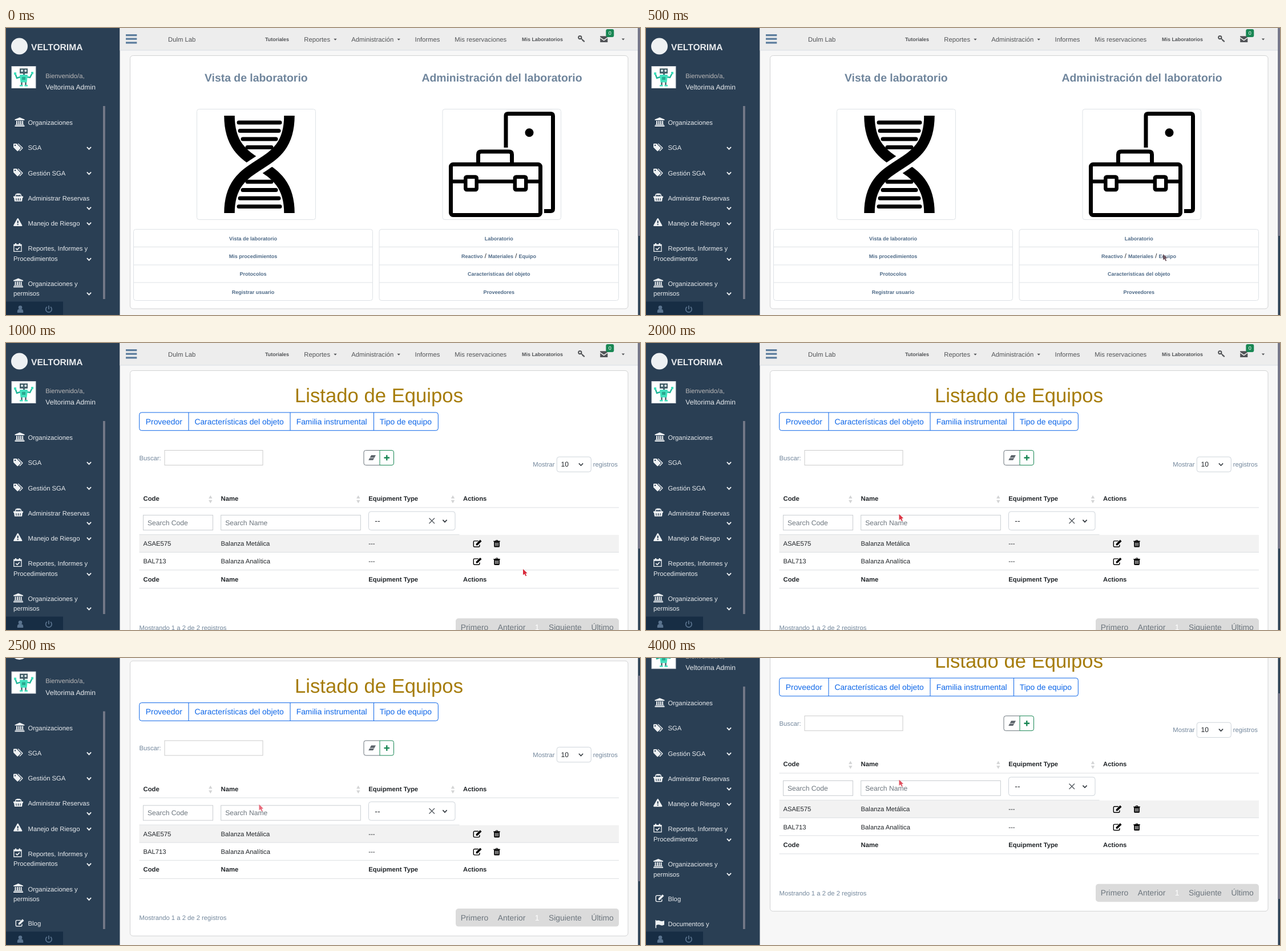
Animation of 1111x504 px, one loop 4.5 s. Source, as an HTML page:

```html
<!DOCTYPE html>
<html lang="es">
<head>
<meta charset="utf-8">
<title>Laboratorio</title>
<style>
html, body { margin: 0; width: 100%; height: 100%; overflow: hidden; background: #f7f7f7; }
svg { display: block; width: 1111px; height: 504px; }
text { font-family: "Liberation Sans", Arial, sans-serif; font-size: 11.27px; fill: #212529; text-rendering: geometricPrecision; white-space: pre; }
.b { font-weight: bold; }
.mid { text-anchor: middle; }
.nav { fill: #515356; }
.small { font-size: 8.95px; }
.link { font-size: 9px; fill: #4e6a87; }
.head { font-size: 19.4px; fill: #6f859c; }
.title { font-size: 34.68px; fill: #a67c0a; }
.muted { fill: #73879c; }
.field { font-size: 12.14px; }
.hint { fill: #6c757d; }
.big { font-size: 13.87px; }
.blue { fill: #0d66e8; }
.side { fill: #e9ecef; }
.line { fill: none; }
</style>
</head>
<body>
<svg id="stage" viewBox="0 0 1111 504">
  <defs>
    <g id="bank"><path d="M8.5 0 17 3.6V5H0V3.6Z"/><path d="M3.5 6V12M7 6V12M10.3 6V12M13.6 6V12" stroke="currentColor" stroke-width="2"/><path d="M1.2 12H15.8V13.2H1.2ZM0 14H17V16H0Z"/></g>
    <g id="tags"><path fill-rule="evenodd" d="M0 1Q0 0 1 0H5.5L12.5 7Q13.2 7.8 12.5 8.5L8 13Q7.2 13.6 6.5 13L0 6.4ZM3 1.8A1.2 1.2 0 1 0 3 4.2 1.2 1.2 0 1 0 3 1.8Z"/><path d="M7.2 0H9L16.2 7Q17 7.8 16.2 8.5L11.6 13.2 10.3 12.6 14.5 8.2Q14.9 7.7 14.4 7.2Z"/></g>
    <g id="basket"><path fill-rule="evenodd" d="M0 5H17V7.4H16L15 14H2L1 7.4H0ZM4.2 8.5 4.6 12.4H5.8L5.4 8.5ZM7.8 8.5V12.4H9.2V8.5ZM11.6 8.5 11.2 12.4H12.4L12.8 8.5Z"/><path class="line" stroke="currentColor" stroke-width="1.4" d="M3 6 4.4 1.5H6.3M14 6 12.6 1.5H10.7M6.3 .8H10.7V2.2H6.3Z"/></g>
    <path id="warn" fill-rule="evenodd" d="M7.7 0Q8.4 0 8.8 .7L15.3 12.4Q15.6 14 14.3 14H1.1Q-.2 14 .1 12.4L6.6 .7Q7 0 7.7 0ZM6.5 4.6 6.9 9H8.5L8.9 4.6ZM6.7 10.2V12H8.7V10.2Z"/>
    <g id="calendar" class="line" stroke="currentColor"><path stroke-width="1.3" d="M.8 2.4H14V14.4H.8Z"/><path stroke-width="2.4" d="M1 3.6H14M4 0V3.6M10.8 0V3.6"/><path stroke-width="1.7" d="M4.2 9 6.6 11.3 10.8 7"/></g>
    <g id="edit"><path class="line" stroke="currentColor" stroke-width="1.4" d="M9.4 2H2.6Q.8 2 .8 3.8V10.6Q.8 12.4 2.6 12.4H9.6Q11.4 12.4 11.4 10.6V8.6"/><path d="M12.4 0 15 2.6 7.8 9.7H5.2V7.1Z"/></g>
    <path id="flag" d="M0 0H1.6V1.4Q5-.2 8 1.4T15.5 1V8.4Q12 10.4 8.6 8.8T1.6 9V14H0Z"/>
    <path id="trash" fill-rule="evenodd" d="M0 2H3.3L4.2 .3H7.3L8.2 2H11.5V3.5H10.6V11.4Q10.6 13 9.2 13H2.3Q.9 13 .9 11.4V3.5H0ZM4.4 2H7.1L6.7 1.3H4.8ZM3 5V11H4V5ZM5.2 5V11H6.2V5ZM7.5 5V11H8.5V5Z"/>
    <path id="chevron" class="line" d="M-3.6-1.9 0 1.9 3.6-1.9"/>
    <path id="caret" d="M0 0H5.4L2.7 2.9Z"/>
    <path id="sort" d="M-3.2-1.5 0-7 3.2-1.5ZM-3.2 1.5 0 7 3.2 1.5Z"/>
  </defs>
  <rect width="1111" height="504" fill="#f7f7f7"/>
  <rect width="199.5" height="504" fill="#2a3f54"/>
  <g id="page">
    <g id="sidebar" fill="#eef1f3" color="#eef1f3"></g>
    <g id="topbar" fill="#515356"></g>
    <g id="lab"></g>
    <g id="list"></g>
    <path id="cursor" d="M0 0V10.5L2.5 8.4 4.7 12.4 6.3 11.6 4.4 7.7 7.5 7.3Z"/>
  </g>
  <rect y="480.5" width="100" height="23.5" fill="#172d44"/>
  <g fill="#5a738e">
    <circle cx="25" cy="490.8" r="3.3"/>
    <path d="M19.8 500V497.5Q20 494 23 493.6H27Q30 494 30.2 497.5V500Z"/>
    <path class="line" stroke="#5a738e" stroke-width="1.7" d="M71.8 489.8A5.2 5.2 0 1 0 78 489.8M74.9 487.5V494"/>
  </g>
  <rect id="sideThumb" x="170" width="3.8" fill="#747988"/>
  <rect x="1107.5" width="3.5" height="504" fill="#2a3f54"/>
  <rect id="pageThumb" x="1107.5" width="3.5" fill="#747488"/>
</svg>
<script>
const $ = id => document.getElementById(id);
const text = (x, y, cls, str) => `<text x="${x}" y="${y}" class="${cls}">${str}</text>`;
const icon = (id, x, y, attrs = '') => `<use href="#${id}" transform="translate(${x} ${y})" ${attrs}/>`;
const box = (x, y, right, bottom, r = 0, stroke = '#dee2e6', fill = '#fff') =>
  `<rect x="${x}" y="${y}" width="${right - x}" height="${bottom - y}" rx="${r}" fill="${fill}" stroke="${stroke}"/>`;
const path = (d, stroke, width = 1, attrs = '') =>
  `<path class="line" d="${d}" stroke="${stroke}" stroke-width="${width}" ${attrs}/>`;
const each = (items, draw) => items.map(draw).join('');

// Sidebar: icon, icon x, icon y, first baseline, lines, chevron y
const menu = [
  ['bank', 15.5, 157, 170, ['Organizaciones']],
  ['tags', 13, 203, 214.3, ['SGA'], 211],
  ['tags', 13, 247, 258.5, ['Gestión SGA'], 255],
  ['basket', 13, 290.5, 302.8, ['Administrar Reservas'], 316.5],
  ['warn', 13, 334, 347, ['Manejo de Riesgo'], 343.5],
  ['calendar', 13, 378, 391.3, ['Reportes, Informes y', 'Procedimientos'], 406],
  ['bank', 13, 439.5, 453, ['Organizaciones y', 'permisos'], 466.5],
  ['edit', 16.5, 502, 513.8, ['Blog']],
  ['flag', 16.5, 547, 558, ['Documentos y']],
];

const robot = `
  <rect x="10" y="67.5" width="42" height="38" fill="#fff" stroke="#d4d9de"/>
  <g stroke="#1fb598" stroke-width="2.4" class="line">
    <path d="M25 86 19 88 16.5 81M37 86 42 87 45.5 80"/>
    <path d="M27.5 95V101M34.5 95V101" stroke="#46606a"/>
  </g>
  <path d="M24 71H38V80H24ZM30 78H33V83H30Z" fill="#46606a"/>
  <path d="M24 82H38L36.5 95.5H25.5ZM24 100H29.5V102.5H24ZM32.5 100H38V102.5H32.5ZM14 78H18V82H14ZM44 77H48V81H44Z" fill="#42e0bd"/>
  <circle cx="28" cy="75" r="1.9" fill="#e8f4f5"/><circle cx="34.3" cy="75" r="1.9" fill="#e8f4f5"/>
  <path d="M28 86H34V91H28Z" fill="#2aa88f"/>`;

$('sidebar').innerHTML =
  '<circle cx="23.5" cy="32" r="14.5"/>' +
  text(44, 39, 'side b" style="font-size:15.6px', 'VELTORIMA') + robot +
  text(69.3, 87.8, '" style="fill:#bab8b8', 'Bienvenido/a,') +
  text(69.3, 108.3, 'side field', 'Veltorima Admin') +
  each(menu, ([id, x, y, base, lines, chevron]) =>
    icon(id, x, y) + text(38.6, base, 'side', lines[0]) +
    (lines[1] ? text(13, base + 17.4, 'side', lines[1]) : '') +
    (chevron ? icon('chevron', 145.5, chevron, 'stroke="#eef1f3" stroke-width="1.9"') : ''));

$('topbar').innerHTML =
  '<rect x="199.5" width="908" height="39" fill="#ededed"/>' + path('M199.5 39H1107.5', '#d9dee4') +
  path('M210 12.6H229.3M210 19.2H229.3M210 25.8H229.3', '#5c7d9d', 3.2) +
  each([[284, 'Dulm Lab'], [522.3, 'Reportes'], [605.3, 'Administración'], [716.5, 'Informes'], [786.3, 'Mis reservaciones']],
    ([x, str]) => text(x, 23.7, 'nav', str)) +
  text(454, 23.2, 'nav b small', 'Tutoriales') + text(904, 23.2, 'nav b small', 'Mis Laboratorios') +
  each([[574.3, 18.8], [685.5, 18.8], [1078.8, 18.6]], ([x, y]) => icon('caret', x, y)) +
  '<circle cx="1005.8" cy="16.6" r="2.6" fill="none" stroke="#515356" stroke-width="2"/>' +
  path('M1007.8 18.4 1013.8 24M1010 22.6 1011.6 20.8M1012 24.2 1013.4 22.4', '#515356', 1.8) +
  '<path d="M1041.2 14.3H1054.3V16L1047.8 20.6 1041.2 16ZM1041.2 17.8 1047.8 22.4 1054.3 17.8V25H1041.2Z"/>' +
  box(1051.3, 2, 1065.3, 16, 3, 'none', '#198754') +
  text(1058.3, 12.2, 'mid" style="fill:#fff;font-size:9px', '0');

const dna = () => {
  const over = 'M496.5 154C496.5 209 468 224 444 240S391.5 271 391.5 325';
  const under = 'M391.5 154C391.5 209 420 224 444 240S496.5 271 496.5 325';
  const rungs = each([[36, 166], [34, 180.5], [29, 195], [21, 209.5]],
    ([half, y]) => `M${444 - half} ${y}H${444 + half}M${444 - half} ${479.5 - y}H${444 + half}`);
  return path(under, '#000', 18.5) + path(over, '#fff', 31) +
    path(rungs, '#000', 7, 'stroke-linecap="round"') + path(over, '#000', 18.5);
};

const toolbox = () =>
  path('M876 210V154Q876 150.500 880 150.500H954.500Q958.500 150.500 958.500 154.500V317.500Q958.500 321.500 954.500 321.500H943', '#000', 7) +
  '<circle cx="917" cy="183.700" r="7.500"/>'.replace(/00"/g, '"') +
  path('M827.5 237V222Q827.5 217 832.5 217H881.5Q886.5 217 886.5 222V237', '#000', 7) +
  `<g stroke-width="7">${box(779.5, 239.5, 936.5, 328.5, 4, '#000')}</g>` +
  path('M779 269.5H937', '#000', 6.5) +
  `<g stroke-width="6.5">${box(805.3, 261.5, 824.7, 284, 2, '#000')}${box(891.8, 261.5, 911.2, 284, 2, '#000')}</g>`;

const linkBox = (x, right, rows) =>
  box(x, 353.5, right, 478.5, 4) +
  path(each([384.5, 416, 447], y => `M${x} ${y}H${right}`), '#dee2e6') +
  each(rows, (row, i) => row ? text((x + right) / 2, 373 + i * 31.2, 'mid b link', row) : '');

$('lab').innerHTML =
  box(217.5, 48.5, 1090, 493, 5, '#d2d3d4') +
  text(438.3, 94, 'mid b head', 'Vista de laboratorio') +
  text(869, 94, 'mid b head', 'Administración del laboratorio') +
  box(334.5, 142.5, 542.5, 336.5, 4) + box(765, 142.5, 972.5, 336.5, 4) + dna() + toolbox() +
  linkBox(223.5, 642.5, ['Vista de laboratorio', 'Mis procedimientos', 'Protocolos', 'Registrar usuario']) +
  linkBox(654, 1073.5, ['Laboratorio', '', 'Características del objeto', 'Proveedores']) +
  each([[798, 'Reactivo'], [845, 'Materiales'], [898.5, 'Equipo']], ([x, str]) => text(x, 404.2, 'b link', str)) +
  text(838.8, 404.2, '', '/') + text(892.2, 404.2, '', '/');

const columns = [[240.5, 'Code'], [376.6, 'Name'], [635.3, 'Equipment Type'], [801, 'Actions']];
const tableHead = y => each(columns, ([x, str]) => text(x, y, 'b', str));
const tableRow = (y, cells) =>
  each(cells, (str, i) => text(columns[i][0], y, '', str)) +
  icon('edit', 818.5, y - 10.5) + icon('trash', 854.3, y - 10.5);

$('list').innerHTML =
  box(217.5, 48.5, 1090, 531.5, 5, '#d2d3d4') +
  text(653.5, 104.3, 'mid title', 'Listado de Equipos') +
  box(233.7, 122, 757.3, 153.7, 4, '#0d66e8') + path('M320 122V153.700M498 122V153.700M644.500 122V153.700', '#0d66e8') +
  each([[244.8, 'Proveedor'], [330.4, 'Características del objeto'], [508.7, 'Familia instrumental'], [654.8, 'Tipo de equipo']],
    ([x, str]) => text(x, 142.6, 'big blue', str)) +
  text(233.5, 205.6, 'muted', 'Buscar:') + box(278, 188.5, 450, 214.5, 0, '#ccc') +
  path('M655 188.500H630.500Q627 188.500 627 192V211Q627 214.500 630.500 214.500H655', '#6c757d') +
  path('M655 188.500H676Q679.500 188.500 679.500 192V211Q679.500 214.500 676 214.500H655Z', '#198754') +
  '<path d="M640 197H648L643.2 205.700H635.200Z" fill="#5b636a"/>' + path('M637.200 201.800H644.600', '#fff', .9) +
  path('M667.3 196.700V206.300M662.500 201.500H672.100', '#198754', 2.4) +
  text(923.3, 217.2, 'muted', 'Mostrar') + box(965.3, 200, 1025.3, 226.3, 4, '#ced4da') +
  text(972.5, 217.3, 'field', '10') + icon('chevron', 1007.5, 213.3, 'stroke="#343a40" stroke-width="1.6"') +
  text(1028.7, 217.2, 'muted', 'registros') +
  tableHead(277) + each([358.3, 617.3, 783], x => icon('sort', x, 274.5, 'fill="#d3d4d5"')) +
  box(233.5, 337, 1074, 367.5, 0, 'none', '#f2f2f2') +
  path('M233.500 289H1074M233.500 336.500H794.500M233.500 367.500H1074M233.500 398.700H1074M233.500 430.700H1074', '#dcdfe2') +
  box(240.5, 302.3, 362.5, 328.5, 0, '#c8ccd0') + box(376.7, 302.3, 621.3, 328.5, 0, '#c8ccd0') +
  text(248, 319.5, 'field hint', 'Search Code') + text(384.2, 319.5, 'field hint', 'Search Name') +
  box(635.5, 296, 787, 328.5, 4, '#ced4da') + text(646.3, 317, 'big', '--') +
  path('M741.500 307.500 751 317M751 307.500 741.500 317', '#555b61', 1.4) +
  icon('chevron', 769, 312.5, 'stroke="#343a40" stroke-width="1.7"') +
  tableRow(356.1, ['ASAE575', 'Balanza Metálica', '---']) +
  tableRow(387.4, ['BAL713', 'Balanza Analítica', '---']) + tableHead(418.5) +
  text(233.5, 503.5, 'muted', 'Mostrando 1 a 2 de 2 registros') +
  box(788, 483.5, 1074, 515, 5, 'none', '#dbdbdb') +
  each([[796.7, 'Primero'], [861.8, 'Anterior'], [951, 'Siguiente'], [1025.5, 'Último']],
    ([x, str]) => text(x, 504.3, 'big hint', str)) +
  text(926.8, 504.3, 'big" style="fill:#fff', '1');

// The cursor is placed in page coordinates, so it scrolls along.
const overLink = [906, 397], overSearch = [443.5, 300.5];
const steps = [
  { at: 0, view: 'lab', scroll: 0 },
  { at: 500, view: 'lab', scroll: 0, cursor: overLink, color: '#6e5660' },
  { at: 1000, view: 'list', scroll: 0, cursor: overLink, color: '#d92b3c' },
  { at: 2000, view: 'list', scroll: 0, cursor: overSearch, color: '#dc3545' },
  { at: 2500, view: 'list', scroll: 43.4, cursor: overSearch, color: '#e8697a' },
  { at: 4000, view: 'list', scroll: 86.8, cursor: overSearch, color: '#e0505e' },
];
const show = (id, on) => $(id).setAttribute('display', on ? 'inline' : 'none');

function render(now) {
  const time = now % 4500;
  const { view, scroll, cursor, color } = steps.findLast(step => step.at <= time);
  show('lab', view === 'lab');
  show('list', view === 'list');
  show('cursor', cursor);
  if (cursor) {
    $('cursor').setAttribute('transform', `translate(${cursor})`);
    $('cursor').setAttribute('fill', color);
  }
  $('page').setAttribute('transform', `translate(0 ${-scroll})`);
  $('sideThumb').setAttribute('y', 137 - scroll);
  $('sideThumb').setAttribute('height', 339 + scroll);
  $('pageThumb').setAttribute('y', scroll * 0.715);
  $('pageThumb').setAttribute('height', view === 'lab' ? 365 : 361);
}

const start = performance.now();
(function frame() {
  render(performance.now() - start);
  requestAnimationFrame(frame);
})();
</script>
</body>
</html>
```
